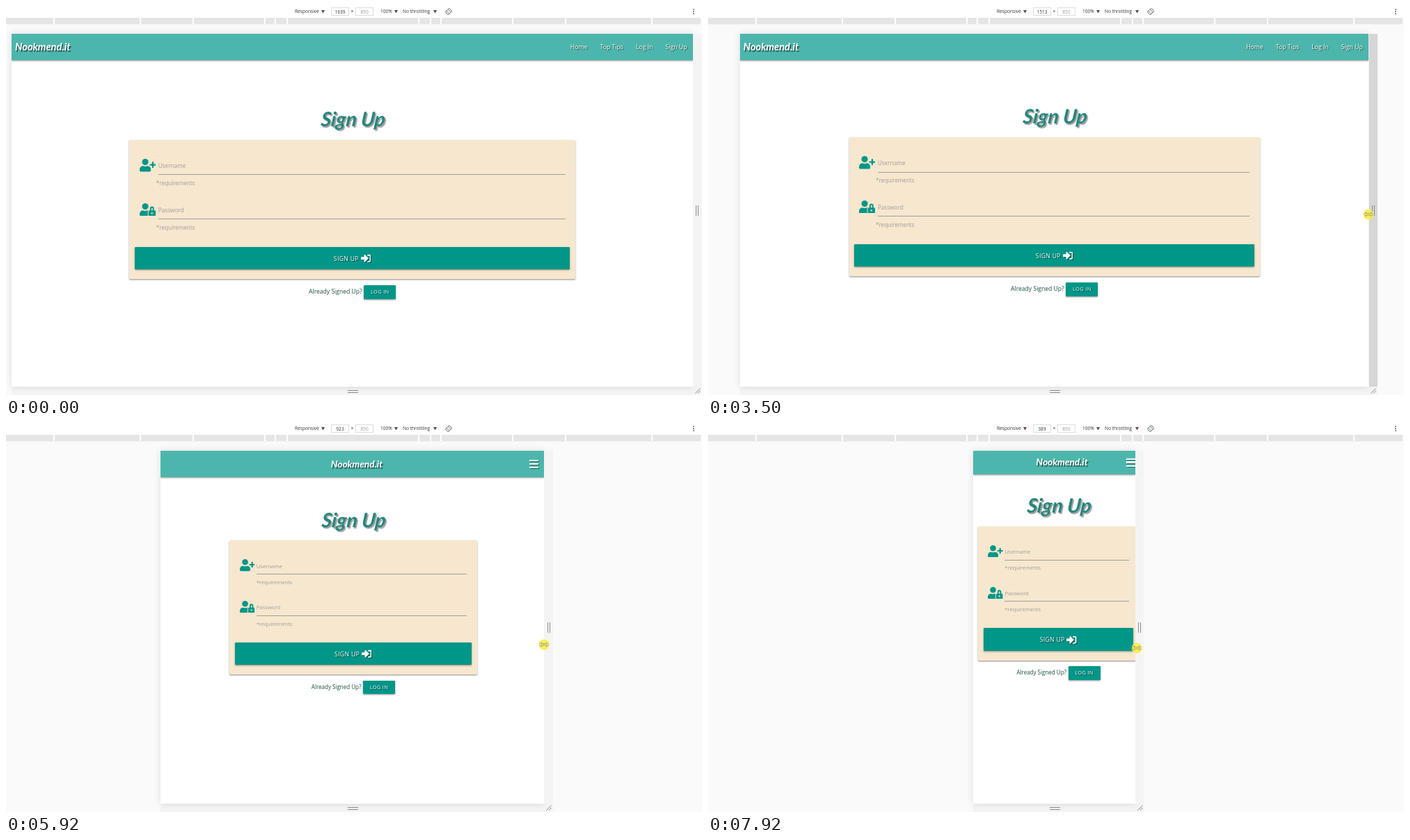
Recreate the animation shown at these times as an HTML page. Size 1000 by 560 pixels, loop 7990 ms.

```html
<!DOCTYPE html>
<html lang="en">
<head>
<meta charset="utf-8">
<title>Responsive sign-up form</title>
<style>
html, body { margin: 0; width: 100%; height: 100%; overflow: hidden; background: #fafafa; }
body { font-family: "Open Sans", "Noto Sans", sans-serif; }
#stage { position: relative; width: 1000px; height: 560px; overflow: hidden; background: #fafafa; }
#stage * { box-sizing: border-box; white-space: nowrap; }
#stage div, #stage .icon, .bar span { position: absolute; }

.bar { left: 0; top: 0; width: 1000px; height: 17px; background: #fff; font-size: 6.6px; line-height: 16px; color: #333; }
.bar .box { top: 2px; width: 26px; height: 12px; line-height: 11px; border: .7px solid #ddd; text-align: center; }
.bar .tri { top: 6px; width: 5px; height: 4.5px; background: #5a4548; clip-path: polygon(0 0, 100% 0, 50% 100%); }
#ruler { left: 0; top: 17px; width: 998px; height: 10px; background: #e5e5e5; border-bottom: 1px solid #f4f4f4; }
#ruler div { top: 0; width: 1.5px; height: 9px; background: #fff; }

#shade { top: 40px; height: 508px; box-shadow: 0 0 10px rgba(0, 0, 0, .12); }
#page { top: 40px; height: 508px; overflow: hidden; background: #fff; }
.raised { box-shadow: 0 1.2px 1.2px rgba(0, 0, 0, .2), 0 1px 3px rgba(0, 0, 0, .26); }
.lit { color: #fff; text-shadow: 1px 1px 1px rgba(0, 0, 0, .6); }
.lit .icon, #menu { filter: drop-shadow(1px 1px .5px rgba(0, 0, 0, .5)); }
#nav { left: 0; width: 100%; background: #4db6ac; }
#brand, #title { font-family: Lato, "Open Sans", sans-serif; font-weight: 700; font-style: italic; }
#brand { font-size: calc(14.6px * var(--r)); text-shadow: 1.5px 1.5px 1px rgba(0, 0, 0, .55); }
#links { right: 8.5px; display: flex; gap: 18px; font-size: calc(8.7px * var(--r)); }
#title { width: 140px; line-height: 40px; text-align: center; font-size: 28.5px; color: #26867c; text-shadow: 2px 2px 1px #a0a0a0; transform: skewX(-6deg); }
#card { background: #f7e7ce; border-radius: 1.5px; }
.field { left: 0; width: 100%; color: #9e9e9e; line-height: 20px; font-size: calc(8.2px * var(--r)); }
.field .icon { left: 14.5px; top: calc(-9.2px * var(--r) - .6px); width: calc(23px * var(--r)); height: calc(18.4px * var(--r)); fill: #009688; }
.field .name { left: calc(41px * var(--r) + 0.4px); top: -10px; }
.field .line { left: calc(41px * var(--r) + 0.4px); right: 14.5px; top: calc(12.4px * var(--r)); height: .8px; background: #9e9e9e; }
.field .note { left: 38.5px; top: calc(25px * var(--r) - 10px); font-size: calc(8.1px * var(--r)); }
.button { background: #009688; border-radius: 1.2px; letter-spacing: .3px; }
#send { left: 7.7px; right: 8px; bottom: 14px; height: 32.4px; line-height: 34.5px; font-size: 8.7px; }
#send span { position: absolute; right: calc(50% - 9.3px); }
#send .icon { left: calc(50% + 12px); top: 9.3px; width: 14.5px; height: 14.5px; }
#foot { width: 240px; height: 20px; line-height: 18.5px; display: flex; justify-content: center; gap: 2.5px; color: #1d4f42; font-size: calc(8.6px * var(--r)); }
#foot .button { position: static; width: 46px; height: 19.6px; line-height: 19.6px; text-align: center; font-size: 7.5px; }
#menu { width: 13.5px; height: 12px; border: solid #fff; border-width: 2.4px 0; }
#menu::after { content: ""; position: absolute; left: 0; top: 2.4px; width: 100%; height: 2.4px; background: #fff; }

#side { top: 40px; width: 12.3px; height: 508px; }
#base { top: 548px; height: 12px; background: #f4f4f4; }
.grip { border: solid #8c8c8c; }
#sideGrip { top: 287px; width: 4px; height: 15px; border-width: 0 1px; }
#baseGrip { left: 490.5px; top: 553px; width: 15px; height: 4px; border-width: 1px 0; }
</style>
</head>
<body>
<div id="stage">
  <div class="bar">
    <span style="left:415px">Responsive</span><span class="tri" style="left:453px"></span>
    <span class="box" id="width" style="left:467px"></span>
    <span style="left:495.5px">×</span>
    <span class="box" style="left:502px;color:#999">850</span>
    <span style="left:538px">100%</span><span class="tri" style="left:558px"></span>
    <span style="left:570px">No throttling</span><span class="tri" style="left:614px"></span>
    <svg class="icon" style="left:631px;top:3px" width="10" height="10" viewBox="-5 -5 10 10" fill="none" stroke="#666" stroke-width=".9">
      <rect x="-1.6" y="-3" width="3.2" height="6" transform="rotate(-45)"/>
      <path d="M-1-4A4 4 0 0 1 4 1M1 4A4 4 0 0 1-4-1"/>
    </svg>
    <svg class="icon" style="left:986px;top:3px" width="4" height="10" fill="#555">
      <circle cx="2" cy="2" r=".9"/><circle cx="2" cy="5" r=".9"/><circle cx="2" cy="8" r=".9"/>
    </svg>
  </div>
  <div id="ruler"></div>
  <div id="base"></div>
  <div id="shade"></div>
  <div id="side"></div>
  <div id="page">
    <div id="nav" class="raised lit">
      <div id="brand">Nookmend.it</div>
      <div id="links"><span>Home</span><span>Top Tips</span><span>Log In</span><span>Sign Up</span></div>
      <div id="menu"></div>
    </div>
    <div id="title">Sign Up</div>
    <div id="card" class="raised">
      <div class="field">
        <svg class="icon" viewBox="0 0 640 512">
          <g id="user"><circle cx="224" cy="128" r="128"/>
          <path d="M134 288q90 32 180 0a134 134 0 0 1 134 134v42a48 48 0 0 1-48 48H48a48 48 0 0 1-48-48v-42a134 134 0 0 1 134-134z"/></g>
          <path d="M432 240h192M528 144v192" stroke="#009688" stroke-width="64" stroke-linecap="round"/>
        </svg>
        <div class="name">Username</div><div class="line"></div><div class="note">*requirements</div>
      </div>
      <div class="field">
        <svg class="icon" viewBox="0 0 640 512">
          <use href="#user"/>
          <g stroke="#f7e7ce" stroke-width="56"><rect x="352" y="288" width="288" height="224" rx="32" paint-order="stroke"/></g>
          <path d="M444 300v-92a52 52 0 0 1 104 0v92" fill="none" stroke="#009688" stroke-width="56"/>
          <circle cx="496" cy="400" r="34" fill="#f7e7ce"/>
        </svg>
        <div class="name">Password</div><div class="line"></div><div class="note">*requirements</div>
      </div>
      <div id="send" class="button raised lit">
        <span>SIGN UP</span>
        <svg class="icon" viewBox="0 0 512 512" fill="#fff">
          <path d="M328 96h88a64 64 0 0 1 64 64v192a64 64 0 0 1-64 64h-88" fill="none" stroke="#fff" stroke-width="64"/>
          <path d="M369 239L201 71q-30-20-41 17v96H24q-24 0-24 24v96q0 24 24 24h136v96q11 37 41 17l168-168q14-17 0-34z"/>
        </svg>
      </div>
    </div>
    <div id="foot"><span>Already Signed Up?</span><div class="button raised lit">LOG IN</div></div>
  </div>
  <div id="sideGrip" class="grip"></div>
  <div id="baseGrip" class="grip"></div>
  <svg id="corner" class="icon" style="top:550px" width="8" height="8" stroke="#777" stroke-width=".9"><path d="M.5 7.5l7-7M4 7.5L7.5 4"/></svg>
  <svg id="cursor" class="icon" width="18" height="18" viewBox="-9 -9 18 18">
    <circle id="halo" r="7.4"/>
    <path id="resize" d="M-6.5 0l3-3v2h7v-2l3 3-3 3v-2h-7v2z" fill="#f8f1a0" stroke="#8b8138" stroke-width=".7"/>
    <path id="arrow" d="M0 0v9l2-2 1.500 3 1.200-.6-1.400-2.900h2.700z" fill="#fff" stroke="#222" stroke-width=".6"/>
  </svg>
</div>
<script>
const LOOP = 7990, STEP = 69.2, DRAG_START = 2654, CURSOR_IN = 530;
const SCALE = .5973, CENTER = 497.5;

// step, viewport width, cursor offset from the page edge, cursor y
const KEYS = [
  [-31, 1639, -24, 556], [-19, 1639, 0, 305], [-16, 1639, 3.5, 297], [-1, 1639, 3, 296.5],
  [3, 1615, 1, 296], [11, 1532, 0, 299], [20, 1359, 0, 305], [23, 1297, 0, 308],
  [30, 1141, -2, 315], [35, 1083, 0, 317], [47, 923, 0, 319], [59, 701, 0, 318],
  [71, 487, 1, 322], [76, 389, 2, 324]
];
// layout per breakpoint: rem ratio, card offset, card height, field rows
const LARGE = { r: 1, top: 143.6, height: 200.7, rows: [37.5, 101] };
const MEDIUM = { r: .967, top: 142.4, height: 196, rows: [36.7, 97.8] };
const SMALL = { r: .933, top: 141.6, height: 193, rows: [36.4, 96.2] };

const $ = id => document.getElementById(id);
const fields = document.querySelectorAll(".field");

for (const x of [68, 192, 268, 371, 386, 403, 592, 609, 624, 727, 803, 927]) {
  const tick = document.createElement("div");
  tick.style.left = x + "px";
  $("ruler").append(tick);
}

function place(id, props) {
  for (const key in props) $(id).style[key] = props[key] + "px";
}
const show = (id, on) => $(id).style.display = on ? "" : "none";

function poseAt(step) {
  let i = 1;
  while (i < KEYS.length - 1 && KEYS[i][0] < step) i++;
  const a = KEYS[i - 1], b = KEYS[i];
  const k = Math.min(1, Math.max(0, (step - a[0]) / (b[0] - a[0])));
  return a.map((v, j) => v + (b[j] - v) * k);
}

function layOut(viewport) {
  const w = viewport * SCALE, left = CENTER - w / 2, right = left + w;
  const phone = viewport <= 600, wide = viewport > 992;
  const tier = viewport >= 1200 ? LARGE : wide ? MEDIUM : SMALL;
  const shift = phone ? 6 : wide ? .2 : 1.4;
  const mid = w / 2 + shift;
  const navH = phone ? 33.5 : 38.3;
  const cardW = phone ? w - 1 : w * 2 / 3 - 12;
  const cardTop = tier.top - 40 + viewport * SCALE * .05 - (phone ? 4.5 : 0);

  $("page").style.setProperty("--r", tier.r);
  place("page", { left, width: w });
  place("shade", { left, width: w });
  place("nav", { height: navH, lineHeight: navH });
  place("brand", { left: wide ? 5 : mid + 5 });
  $("brand").style.transform = wide ? "" : "translateX(-50%)";
  show("links", wide);
  show("menu", !wide);
  place("menu", { left: w + 2 * shift - 24.3, top: navH / 2 - 6 });
  place("title", { left: mid - 68.5, top: cardTop - 50.5 });
  place("card", { left: mid - cardW / 2, width: cardW, top: cardTop, height: tier.height });
  fields.forEach((f, i) => f.style.top = tier.rows[i] + "px");
  place("foot", { left: mid - 120, top: cardTop + tier.height + 8.7 });
  place("side", { left: right + .3 });
  place("base", { left, width: w + 12.5 });
  place("sideGrip", { left: right + 4.5 });
  place("corner", { left: right + 3 });
  $("width").textContent = Math.round(viewport);
  return right;
}

function draw(now) {
  const t = now % LOOP;
  const step = Math.floor((t - DRAG_START) / STEP);
  const [, viewport, dx, y] = poseAt(step);
  const right = layOut(viewport);
  const onHandle = step >= -18;
  $("side").style.background = onHandle && step < 33 ? "#d6d6d6" : "#f4f4f4";
  show("cursor", t >= CURSOR_IN);
  show("resize", onHandle);
  show("arrow", !onHandle);
  $("halo").setAttribute("fill", step >= -6 ? "rgba(246,236,70,.88)" : "rgba(248,242,130,.8)");
  place("cursor", { left: right + dx - 9, top: y - 9 });
  requestAnimationFrame(draw);
}
const start = performance.now();
requestAnimationFrame(function first() { draw(0); });
draw = (render => () => render(performance.now() - start))(draw);
</script>
</body>
</html>
```
